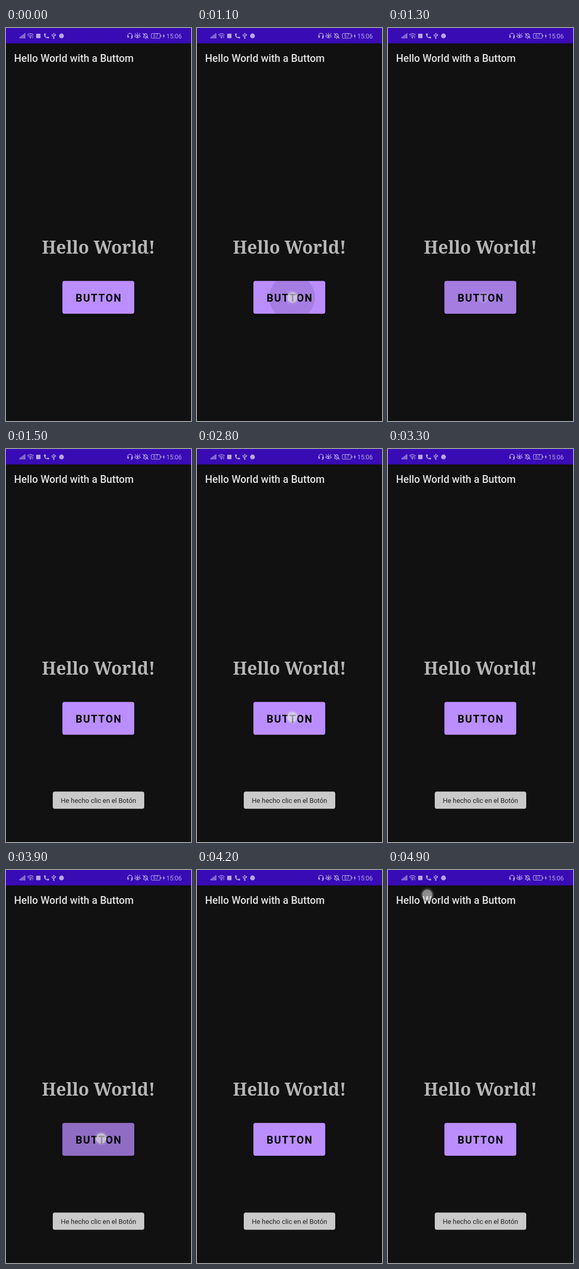
Recreate the animation shown at these times as an HTML page. Size 356 px wide and 754 px high, loop 5 s.

```html
<!DOCTYPE html>
<html lang="es">
<head>
<meta charset="utf-8">
<title>Hello World</title>
<style>
html, body { margin: 0; width: 100%; height: 100%; overflow: hidden; background: #111; }
svg { display: block; width: 356px; height: 754px; }
text { font-family: Roboto, sans-serif; }
.title { font-size: 19.8px; font-weight: 500; fill: #e1e1e1; }
.hello { font: bold 33.6px "Noto Serif", serif; fill: #b6b6b6; text-anchor: middle; }
.label { font-size: 20px; font-weight: 700; letter-spacing: 1.78px; }
.clock { font-size: 12px; }
.level { font-size: 8.5px; }
.note { font-size: 12.9px; fill: #222; text-anchor: middle; }
.icons { fill: #b8a6e6; }
.line { fill: none; stroke: #b8a6e6; stroke-width: 1.2; stroke-linecap: round; stroke-linejoin: round; }

.dot, .ripple, .toast { animation: 5s step-end infinite; }
.dot { animation-name: dot; }
.ripple { animation-name: ripple; }
.toast { animation-name: toast; }

@keyframes dot {
  0% { opacity: 0; transform: translate(183.5px, 517px); }
  22% { opacity: 1; transform: translate(183.5px, 517px); }
  26% { opacity: .3; transform: translate(183.5px, 517px); }
  28% { opacity: 0; transform: translate(183px, 514.5px); }
  56% { opacity: 1; transform: translate(183px, 514.5px); }
  62% { opacity: .3; transform: translate(183px, 514.5px); }
  64% { opacity: 0; transform: translate(183px, 515px); }
  74% { opacity: 1; transform: translate(183px, 515px); }
  80% { opacity: .3; transform: translate(183px, 515px); }
  82% { opacity: 0; transform: translate(75.5px, 47.5px); }
  94% { opacity: 1; transform: translate(75.5px, 47.5px); }
  98% { opacity: .93; transform: translate(75.5px, 47.5px); }
  100% { opacity: 0; transform: translate(75.5px, 47.5px); }
}
@keyframes ripple {
  0% { opacity: 0; transform: scale(.44); }
  22% { opacity: .11; transform: scale(.44); }
  24% { opacity: .23; transform: scale(1); }
  26% { opacity: .12; transform: scale(1); }
  28% { opacity: .03; transform: scale(1); }
  30% { opacity: 0; transform: scale(.44); }
  58% { opacity: .11; transform: scale(.44); }
  60% { opacity: .23; transform: scale(1); }
  62% { opacity: .12; transform: scale(1); }
  64% { opacity: .03; transform: scale(1); }
  66% { opacity: 0; transform: scale(.44); }
  76% { opacity: .11; transform: scale(.44); }
  78% { opacity: .23; transform: scale(1); }
  80% { opacity: .12; transform: scale(1); }
  82% { opacity: .03; transform: scale(1); }
  84%, 100% { opacity: 0; transform: scale(.44); }
}
@keyframes toast {
  0% { opacity: 0; }
  28% { opacity: .5; }
  30% { opacity: 1; }
  62% { opacity: 0; }
  64% { opacity: .5; }
  66% { opacity: 1; }
  80% { opacity: 0; }
  82% { opacity: .5; }
  84%, 100% { opacity: 1; }
}
</style>
</head>
<body>
<svg viewBox="0 0 356 754">
  <defs>
    <clipPath id="face"><rect x="108.5" y="485.3" width="138.3" height="63" rx="4"/></clipPath>
    <radialGradient id="touch">
      <stop offset="0" stop-color="#f2f2f2" stop-opacity=".62"/>
      <stop offset=".66" stop-color="#eee" stop-opacity=".6"/>
      <stop offset=".75" stop-color="#ddd" stop-opacity=".24"/>
      <stop offset="1" stop-color="#ccc" stop-opacity=".04"/>
    </radialGradient>
    <filter id="soft"><feGaussianBlur stdDeviation="2"/></filter>
  </defs>

  <rect width="356" height="754" fill="#111"/>
  <rect width="356" height="29.5" fill="#380bb5"/>

  <g class="icons">
    <!-- signal -->
    <path d="M26 17h1.4v3H26zM28.4 15.3h1.4V20h-1.4zM30.8 13.6h1.4V20h-1.4zM33.2 11.8h1.4V20h-1.4zM35.6 10H37v10h-1.4z"/>
    <!-- wifi -->
    <path class="line" d="M41.3 13q5.7-4.8 11.4 0M43.2 15.3q3.8-3 7.4 0M45.2 17.4q1.8-1.4 3.5 0"/>
    <circle cx="47" cy="19" r="1.1"/>
    <path d="M50.4 17.2l1.2-1.6 1.2 1.6zM50.4 18.2l1.2 1.6 1.2-1.6z"/>
    <rect x="58" y="11" width="8.4" height="8.4" rx=".8"/>
    <!-- phone -->
    <path d="M74 10.5h2.3l.6 2.8-1.5 1.4q1.2 2.2 3.3 3.2l1.4-1.5 2.7.6v2.3q0 .8-1 .8-8.8-.6-8.8-8.8 0-.8 1-.8z"/>
    <!-- usb -->
    <path class="line" d="M92 11.5V19M92 17.2l-3-1.8v-2M92 16l3-1.6v-1.6"/>
    <path d="M90.3 11.8L92 9l1.7 2.8z"/>
    <circle cx="92" cy="19.3" r="1.4"/>
    <circle cx="89" cy="13.2" r="1.1"/>
    <rect x="94" y="11.7" width="2.1" height="2.1"/>
    <circle cx="106.8" cy="15.2" r="4.6"/>
    <!-- headset -->
    <path class="line" d="M234.2 16v-1.4a4.4 4.4 0 0 1 8.8 0V18q0 2-2.6 2"/>
    <path d="M233.5 14.6h2.8v4.2h-1.4q-1.4 0-1.4-1.4zM241 14.6h2.8v2.8q0 1.4-1.4 1.4H241z"/>
    <!-- eye -->
    <path class="line" d="M247.6 15.8q5.5-6 11 0-5.5 6-11 0zM249.4 12l-1-1.4M253.1 11V9.6M256.8 12l1-1.4"/>
    <circle cx="253.1" cy="15.8" r="1.9"/>
    <!-- muted bell -->
    <path class="line" d="M264.3 18h8.6l-1.2-1.8V14q0-3-3.1-3.2-3.1.2-3.1 3.2v2.2zM267.5 19.8h2.2M263.6 10.3l10 9.6"/>
    <!-- battery -->
    <rect class="line" x="279.6" y="10.6" width="17" height="9" rx="1.4" style="stroke-width:1"/>
    <rect x="297.4" y="13.3" width="1.4" height="3.6"/>
    <text class="level" x="283.3" y="18.2">67</text>
    <path d="M304.3 10.8l-3 5h2l-.6 4.2 3.2-5.4h-2z"/>
    <text class="clock" x="308.4" y="19.7">15:06</text>
  </g>

  <text class="title" x="15.5" y="65">Hello World with a Buttom</text>
  <text class="hello" x="178" y="433">Hello World!</text>

  <rect x="109" y="487" width="138" height="63" rx="4" fill="#000" opacity=".5" filter="url(#soft)"/>
  <rect x="108.5" y="485.3" width="138.3" height="63" rx="4" fill="#bb8eff"/>
  <g clip-path="url(#face)">
    <g transform="translate(183 517)"><circle class="ripple" r="100"/></g>
  </g>
  <text class="label" x="134" y="524.6">BUTTON</text>

  <g class="toast">
    <rect x="90" y="657.3" width="176" height="33" rx="4" fill="#cacaca"/>
    <text class="note" x="178" y="678.8">He hecho clic en el Botón</text>
  </g>

  <circle class="dot" r="14" fill="url(#touch)"/>
</svg>
</body>
</html>
```
